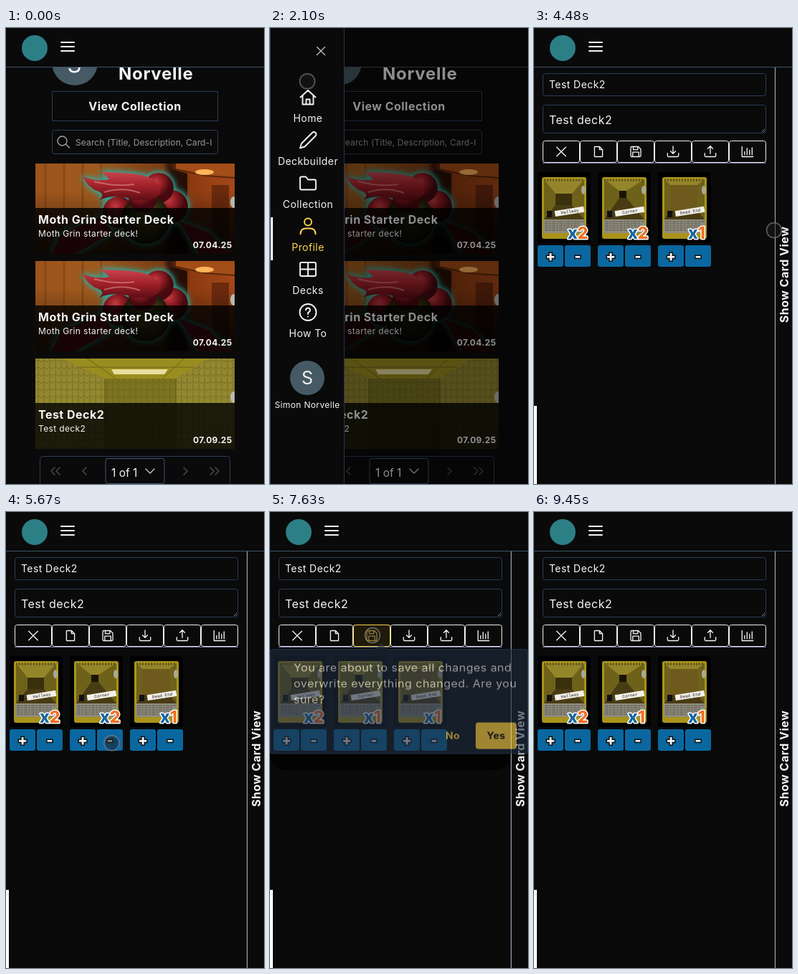
An HTML page that plays this animation: 360x636 px, repeating every 9800 ms.

```html
<!DOCTYPE html>
<html lang="en">
<head>
<meta charset="utf-8">
<title>Deck app demo</title>
<style>
html, body { margin: 0; width: 100%; height: 100%; overflow: hidden; background: #0a0a0a; }
svg { display: block; }
#stage { width: 100vw; height: 100vh; }
text { font-family: Inter, "Open Sans", sans-serif; letter-spacing: .03em; fill: #f4f4f4; }
.b { font-weight: 700; }
.mid { text-anchor: middle; }
.end { text-anchor: end; }
.ico { fill: none; stroke: currentColor; stroke-width: 1.9; stroke-linecap: round; stroke-linejoin: round; }
.thin { stroke-width: 1.4; }
.field { fill: #0a0a0a; stroke: #2b3d58; }
.hint { font-size: 12px; letter-spacing: .01em; fill: #999; }
.tag { font: 6px "Liberation Mono", monospace; fill: #222; letter-spacing: 0; }
.badge { font-size: 23px; font-weight: 800; letter-spacing: 0; paint-order: stroke; stroke: #fff; stroke-width: 3px; stroke-linejoin: round; }
.sign { font-size: 20px; font-weight: 800; letter-spacing: 0; paint-order: stroke; stroke: #111; stroke-width: 3px; }

.profile, .deck, .close, .one, .two, .bar, .lit-a, .lit-b, .save {
  animation: 9.8s step-end infinite;
}
.profile { animation-name: leave; }
.deck { animation-name: enter; }
.bar { animation-name: bar; }
.lit-a { animation-name: unlit; }
.lit-b { animation-name: lit; }
.close { animation-name: ring; }
.two { animation-name: two; }
.one { animation-name: one; }
.save { animation-name: save; }
.mask { animation: mask 9.8s linear infinite; }
.drawer { animation: drawer 9.8s cubic-bezier(0, 0, .2, 1) infinite; }
.popup { animation: popup 9.8s linear infinite; transform-origin: 155px 191px; }
.touch { animation: move 9.8s ease-in-out infinite, touch 9.8s step-end infinite; }

@keyframes leave { 0% { opacity: 1 } 33.57%, 100% { opacity: 0 } }
@keyframes enter { 0% { opacity: 0 } 33.57%, 100% { opacity: 1 } }
@keyframes bar { 0% { transform: translateY(264px) } 33.57%, 100% { transform: translateY(144px) } }
@keyframes unlit { 0% { color: #ffd54f } 33.57%, 100% { color: #f4f4f4 } }
@keyframes lit { 0% { color: #f4f4f4 } 30%, 100% { color: #ffd54f } }
@keyframes ring { 0% { opacity: 0 } 36.4% { opacity: 1 } 43.5%, 100% { opacity: 0 } }
@keyframes two { 0% { opacity: 1 } 63.57%, 100% { opacity: 0 } }
@keyframes one { 0% { opacity: 0 } 63.57%, 100% { opacity: 1 } }
@keyframes save { 0% { opacity: 0 } 76.4% { opacity: 1 } 90.7%, 100% { opacity: 0 } }
@keyframes mask { 0%, 18.8% { opacity: 0 } 21.2%, 40.3% { opacity: .42 } 43.1%, 100% { opacity: 0 } }
@keyframes drawer {
  0%, 18.8% { transform: translateX(-105px) }
  21.2%, 40.3% { transform: none }
  43.1%, 100% { transform: translateX(-105px) }
}
@keyframes popup {
  0%, 77% { opacity: 0; transform: scaleY(.8) }
  78.4% { opacity: 1; transform: none }
  90.3% { opacity: 1; transform: none }
  91.4%, 100% { opacity: 0; transform: none }
}
@keyframes touch { 0% { opacity: 0 } 8.6% { opacity: 1 } 96.3%, 100% { opacity: 0 } }
@keyframes move {
  0%, 8.6% { transform: translate(205px, 594px) }
  14.3% { transform: translate(118px, 120px); animation-timing-function: ease-out }
  17.35%, 18.9% { transform: translate(85px, 30px) }
  21.43% { transform: translate(52px, 74px); animation-timing-function: ease-out }
  25.5% { transform: translate(54px, 164px) }
  33.2% { transform: translate(54px, 167px) }
  36.7%, 40.3% { transform: translate(75px, 33px) }
  45.71% { transform: translate(335px, 282px); animation-timing-function: ease-out }
  50%, 51.4% { transform: translate(344px, 302px); animation-timing-function: ease-in }
  56.1% { transform: translate(165px, 338px); animation-timing-function: ease-out }
  58.6%, 66.4% { transform: translate(145px, 320px) }
  70.71% { transform: translate(187px, 167px) }
  75.5%, 83.2% { transform: translate(143px, 172px) }
  87.14% { transform: translate(303px, 315px); animation-timing-function: ease-out }
  88.8%, 90.6% { transform: translate(312px, 322px); animation-timing-function: ease-in }
  93.6% { transform: translate(250px, 469px); animation-timing-function: linear }
  96.3%, 100% { transform: translate(197px, 652px) }
}
</style>
</head>
<body>
<svg id="stage" viewBox="0 0 360 636" preserveAspectRatio="none">
  <defs>
    <linearGradient id="wall">
      <stop offset="0" stop-color="#9c541c"/><stop offset=".3" stop-color="#a05a1e"/>
      <stop offset=".64" stop-color="#7a3c14"/><stop offset=".67" stop-color="#3a170a"/>
      <stop offset=".78" stop-color="#8c3a10"/><stop offset="1" stop-color="#a4481a"/>
    </linearGradient>
    <linearGradient id="shade" x2="0" y2="1">
      <stop offset=".3" stop-opacity="0"/><stop offset="1" stop-opacity=".6"/>
    </linearGradient>
    <linearGradient id="hair" x2="0" y2="1">
      <stop offset="0" stop-color="#c8444c"/><stop offset=".5" stop-color="#a02028"/><stop offset="1" stop-color="#5c0d14"/>
    </linearGradient>
    <radialGradient id="lobe" cx=".4" cy=".3">
      <stop offset="0" stop-color="#c23c42"/><stop offset=".5" stop-color="#8e1a22"/><stop offset="1" stop-color="#45090f"/>
    </radialGradient>
    <radialGradient id="dark"><stop offset="0" stop-color="#6a6420"/><stop offset="1" stop-color="#1d1a0a"/></radialGradient>
    <pattern id="paper" width="8" height="10" patternUnits="userSpaceOnUse">
      <path d="M0 5l4-4 4 4M4 2v8" fill="none" stroke="#5f5a1c" opacity=".6"/>
    </pattern>
    <clipPath id="cover"><path d="M0 0h278v126H0z"/></clipPath>
    <clipPath id="search"><path d="M90 143h198v32H90z"/></clipPath>

    <g id="doll">
      <path fill="url(#wall)" d="M0 0h278v126H0z"/>
      <path d="M14 0v126M40 0v126M66 0v126M92 0v126" stroke="#7d4014" stroke-width="3" opacity=".6"/>
      <path fill="#a34d18" d="M196 0h82v20l-40-3-42-9z"/>
      <path d="M196 8l42 9 40 3" stroke="#5a260c" stroke-width="2" fill="none"/>
      <ellipse cx="236" cy="12" rx="13" ry="4" fill="#ffb45c"/>
      <path fill="#260e06" d="M188 8l24 6v112h-24z"/>
      <path fill="#6b2a0e" d="M246 30h24v96h-24z"/>
      <path fill="url(#shade)" d="M0 0h278v126H0z"/>
      <g style="filter:drop-shadow(0 0 3px #2fa99c) drop-shadow(0 0 4px #2fa99c)">
        <path fill="#78161d" d="M92 74l-56 24-14 28h34l52-30zM200 80l42 16 30 30h-44z"/>
        <circle cx="116" cy="68" r="22" fill="url(#lobe)"/>
        <circle cx="190" cy="60" r="23" fill="url(#lobe)"/>
        <circle cx="172" cy="34" r="21" fill="url(#lobe)"/>
        <circle cx="154" cy="78" r="34" fill="url(#dark)"/>
        <circle cx="150" cy="48" r="20" fill="url(#lobe)"/>
        <path fill="url(#hair)" d="M66 18q20 8 37 4-8-8-13-10 34 0 58 4 24 5 27 24-8 16-38 10-30-8-48 1 9-8-1-12-15-5-22-21z"/>
      </g>
      <path d="M82 25q30 8 56 4M96 40q26-8 50 1" fill="none" stroke="#e08a8c" stroke-width="2" opacity=".6"/>
      <ellipse cx="277" cy="54" rx="5" ry="8" fill="#b9b9b0"/>
    </g>
    <g id="yellow">
      <path fill="#938830" d="M0 0h278v126H0z"/>
      <path fill="url(#paper)" d="M0 0h278v126H0z"/>
      <path fill="#9a8d20" d="M38 0h202l-44 28H97z"/>
      <path d="M72 0l41 28M208 0l-31 28M62 12h158" stroke="#6c6318" fill="none"/>
      <path fill="#7d7420" d="M97 28h99v98H97z"/>
      <path fill="url(#paper)" d="M97 28h99v98H97z"/>
      <path fill="#e8dfa0" d="M106 15h79l-5 7h-70z"/>
      <path d="M97 28v98M196 28v98" stroke="#5f5814"/>
      <ellipse cx="277" cy="54" rx="5" ry="8" fill="#b9b9b0"/>
    </g>

    <path id="home" d="M1.500 12 12 2.500 22.500 12M4.500 10v12h15V10M9.500 22v-7h5v7"/>
    <path id="pencil" d="M18 1.500a2.900 2.900 0 0 1 4.500 4.500L7.500 21 1 23l2-6.500z"/>
    <path id="folder" d="M1 5q0-2 2-2h6l3 4h9q2 0 2 2v10q0 2-2 2H3q-2 0-2-2z"/>
    <path id="user" d="M12 1a5 5 0 0 1 0 10a5 5 0 0 1 0-10M1.500 23q0-8 8-8h5q8 0 8 8"/>
    <path id="grid" d="M3 2.500h18q2 0 2 2v15q0 2-2 2H3q-2 0-2-2v-15q0-2 2-2zM12 2.500v19M1 12h22"/>
    <path id="help" d="M12 .5a11.500 11.500 0 0 1 0 23a11.500 11.500 0 0 1 0-23M9 9q0-3 3-3t3 3q0 2-3 3.500v2M12 18v.1"/>
    <path id="cross" d="M3 3l18 18M21 3 3 21"/>
    <path id="page" d="M4 3q0-1 1-1h9l6 6v13q0 1-1 1H5q-1 0-1-1zM14 2v6h6"/>
    <path id="disk" d="M2 4q0-2 2-2h13l5 5v13q0 2-2 2H4q-2 0-2-2zM7 2v6h9V3M6 22v-9h12v9"/>
    <path id="down" d="M12 1v15M7 11l5 5 5-5M1 15v5q0 2 2 2h18q2 0 2-2v-5"/>
    <path id="up" d="M12 16V1M7 6l5-5 5 5M1 15v5q0 2 2 2h18q2 0 2-2v-5"/>
    <path id="chart" d="M1 2v20h22M6 18v-6M11 18V5M16 18V9M21 18V4"/>
  </defs>

  <rect width="360" height="636" fill="#0a0a0a"/>

  <g class="profile">
    <circle cx="96" cy="48" r="32" fill="#455a64"/>
    <text class="mid" x="96" y="62" font-size="31">S</text>
    <text class="b" x="157" y="72" font-size="24">Norvelle</text>
    <rect class="field" x="64.500" y="88.500" width="231" height="41"/>
    <text class="b mid" x="180" y="115" font-size="16">View Collection</text>
    <rect class="field" x="64.500" y="142.500" width="231" height="33" rx="3"/>
    <path class="ico thin" color="#a5a5a5" d="M78.500 151a6.500 6.500 0 0 1 0 13a6.500 6.500 0 0 1 0-13M83.500 162l5 5"/>
    <g clip-path="url(#search)"><text class="hint" x="97" y="163.500">Search (Title, Description, Card-ID)</text></g>
    <g id="decks"></g>
    <rect class="field" x="47.500" y="597.500" width="265" height="42" rx="4"/>
    <path class="ico thin" color="#505050" d="M68 613l-5 5 5 5M75 613l-5 5 5 5M112 613l-5 5 5 5M248 613l5 5-5 5M285 613l5 5-5 5M292 613l5 5-5 5"/>
    <rect class="field" x="139" y="600.500" width="82" height="35" rx="3" style="stroke:#3d5876"/>
    <text x="147" y="626" font-size="15.500" style="letter-spacing:0">1 of 1</text>
    <path class="ico thin" color="#c8c8c8" d="M195 615l6 6 6-6"/>
  </g>

  <g class="deck">
    <path d="M336.500 55v581" stroke="#a9b9c9"/>
    <text class="b mid" font-size="16" transform="translate(355 344) rotate(-90)">Show Card View</text>
    <rect class="field" x="12.500" y="63.500" width="311" height="31" rx="3"/>
    <text x="21" y="84" font-size="14">Test Deck2</text>
    <rect class="field" x="12.500" y="107.500" width="311" height="39" rx="3"/>
    <text x="21" y="134" font-size="16">Test deck2</text>
    <path d="M318 145l4-4M321 145l1-1" stroke="#999"/>
    <path d="M12 188.500h312" stroke="#6c6c9c"/>
    <g id="tools"></g>
    <g class="save" color="#ffd54f">
      <rect x="116.500" y="157.500" width="51" height="30" rx="3" fill="#1f1a0a" stroke="#ffd54f"/>
      <use class="ico" href="#disk" transform="translate(133.600 164.100) scale(.7)"/>
    </g>
    <g id="cards"></g>
    <path fill="#fff" d="M0 527h4v109H0z"/>
  </g>

  <path fill="#0a0a0a" d="M0 0h360v54H0z"/>
  <path d="M0 54.500h360" stroke="#3d5468"/>
  <circle cx="40" cy="28" r="18" fill="#2d7f86"/>
  <path d="M77 20h18M77 26h18M77 32h18" stroke="#f4f4f4" stroke-width="2" stroke-linecap="round"/>

  <rect class="mask" width="360" height="636"/>

  <g class="drawer">
    <path fill="#0a0a0a" d="M0 0h104v636H0z"/>
    <path d="M.5 0v636M103.500 0v636" stroke="#24364f"/>
    <g class="close" fill="none" stroke="#d5d5d5">
      <circle cx="75" cy="33" r="22.500"/><circle cx="75" cy="33" r="20" stroke="#8a8a8a"/>
    </g>
    <path class="ico thin" color="#bdbdbd" d="M65.500 26.500l11 11M76.500 26.500l-11 11"/>
    <rect class="bar" x="1" width="3" height="60" fill="#fff"/>
    <g id="menu"></g>
    <circle cx="52" cy="488" r="24" fill="#455a64"/>
    <text class="mid" x="52" y="497" font-size="25" style="letter-spacing:0">S</text>
    <text class="mid" x="52" y="529.500" font-size="12">Simon Norvelle</text>
  </g>

  <g class="popup">
    <path d="M0 349h336v8q-4 17-30 17H26Q4 374 0 357z"/>
    <path fill="#1f2d40" stroke="#304562" d="M.5 194q0-2.500 3-2.500H147l8-8.500 8 8.500h193.500q3 0 3 2.500v152q0 3-3 3H3.500q-3 0-3-3z"/>
    <g font-size="16">
      <text x="33" y="225">You are about to save all changes and</text>
      <text x="33" y="249">overwrite everything changed. Are you</text>
      <text x="33" y="273">sure?</text>
    </g>
    <text class="b mid" x="255" y="327" font-size="14" style="fill:#ffd54f">No</text>
    <rect x="287" y="302" width="57" height="40" rx="4" fill="#ffd54f"/>
    <text class="b mid" x="315.500" y="327" font-size="14" style="fill:#212529">Yes</text>
  </g>

  <g class="touch">
    <circle r="10.500" fill="#1c1c1c" fill-opacity=".48" stroke="#8c8c8c" stroke-opacity=".7" stroke-width="1.500"/>
  </g>
</svg>
<script>
const fill = (id, list, draw) => {
  document.getElementById(id).innerHTML = list.map(draw).join('');
};
const icon = (name, x, y, scale = 1) =>
  `<use class="ico" href="#${name}" transform="translate(${x - 12 * scale} ${y - 12 * scale}) scale(${scale})"/>`;

fill('decks', [
  ['doll', 'Moth Grin Starter Deck', 'Moth Grin starter deck!', '07.04.25'],
  ['doll', 'Moth Grin Starter Deck', 'Moth Grin starter deck!', '07.04.25'],
  ['yellow', 'Test Deck2', 'Test deck2', '07.09.25']
], ([art, title, note, date], i) => `
  <g transform="translate(41 ${189 + i * 136})">
    <g clip-path="url(#cover)"><use href="#${art}"/></g>
    <path d="M0 62h278v64H0z" opacity=".8"/>
    <text class="b" x="4" y="83.500" font-size="16">${title}</text>
    <text x="4" y="102" font-size="12">${note}</text>
    <text class="b end" x="274.500" y="118" font-size="12">${date}</text>
  </g>`);

fill('menu', [
  ['home', 'Home'], ['pencil', 'Deckbuilder', 'lit-b'], ['folder', 'Collection'],
  ['user', 'Profile', 'lit-a'], ['grid', 'Decks'], ['help', 'How To']
], ([name, label, lit = ''], i) => `
  <g class="${lit}" color="#f4f4f4" transform="translate(53 ${96.5 + i * 60})">
    ${icon(name, 0, 0)}
    <text class="mid" y="34" font-size="14" style="fill:currentColor">${label}</text>
  </g>`);

fill('tools', ['cross', 'page', 'disk', 'down', 'up', 'chart'], (name, i) => `
  <g color="#f4f4f4" transform="translate(${12 + i * 52} 157)">
    <rect x=".5" y=".5" width="51" height="30" rx="3" fill="#0a0a0a" stroke="#f0f0f0"/>
    ${icon(name, 26, 15.5, .7)}
  </g>`);

const badge = (n, cls = '') => `
  <text class="badge ${cls}" x="42" y="93" style="fill:#1565a0">x<tspan fill="#f26f21">${n}</tspan></text>`;
const button = (x, sign) => `
  <rect x="${x}" y="102" width="36" height="30" rx="3" fill="#0a67a0"/>
  <text class="sign mid" x="${x + 18}" y="124">${sign}</text>`;

// A room seen in perspective: the far wall spans l..r and t..b
const room = (l, t, r, b, far) => `
  <path fill="#6e6119" d="M9 10h56v56H9z"/>
  <path fill="#94852a" d="M9 10h56L${r} ${t}H${l}z"/>
  <path fill="#493c14" d="M9 66h56L${r} ${b}H${l}z"/>
  <path fill="${far}" d="M${l} ${t}H${r}V${b}H${l}z"/>`;

fill('cards', [
  ['Hallway', badge(2), room(25, 30, 48, 46, '#3a300c')],
  ['Corner', badge(2, 'two') + badge(1, 'one'), room(30, 26, 40, 36, '#191505')],
  ['Dead End', badge(1), room(17, 18, 55, 54, '#6d5a1c')]
], ([name, count, scene], i) => `
  <g transform="translate(${5 + i * 84} 201)">
    <rect width="74" height="99" rx="3" fill="#000"/>
    <rect x="6" y="7" width="62" height="86" rx="3" fill="#a8931d"/>
    ${scene}
    <path d="M9 11h56" stroke="#5d5214" stroke-width="3" stroke-dasharray="2 2"/>
    <ellipse cx="64" cy="25" rx="3" ry="6" fill="#aaa99a"/>
    <path d="M8 66h58v19H8z" fill="#8f8c7c"/>
    <path d="M10 69h54M10 72h50M10 75h53M10 78h46M10 81h40" stroke="#55524a" stroke-dasharray="5 1 3 1"/>
    <path d="M13 54h7v9h-7z" fill="#111"/>
    <g transform="rotate(-9 44 55)">
      <path d="M24 51h41v8H24z" fill="#f2f0e8"/>
      <text class="tag mid" x="45" y="57">${name}</text>
    </g>
    ${count}
    ${button(0, '+')}${button(38, '-')}
  </g>`);
</script>
</body>
</html>
```
